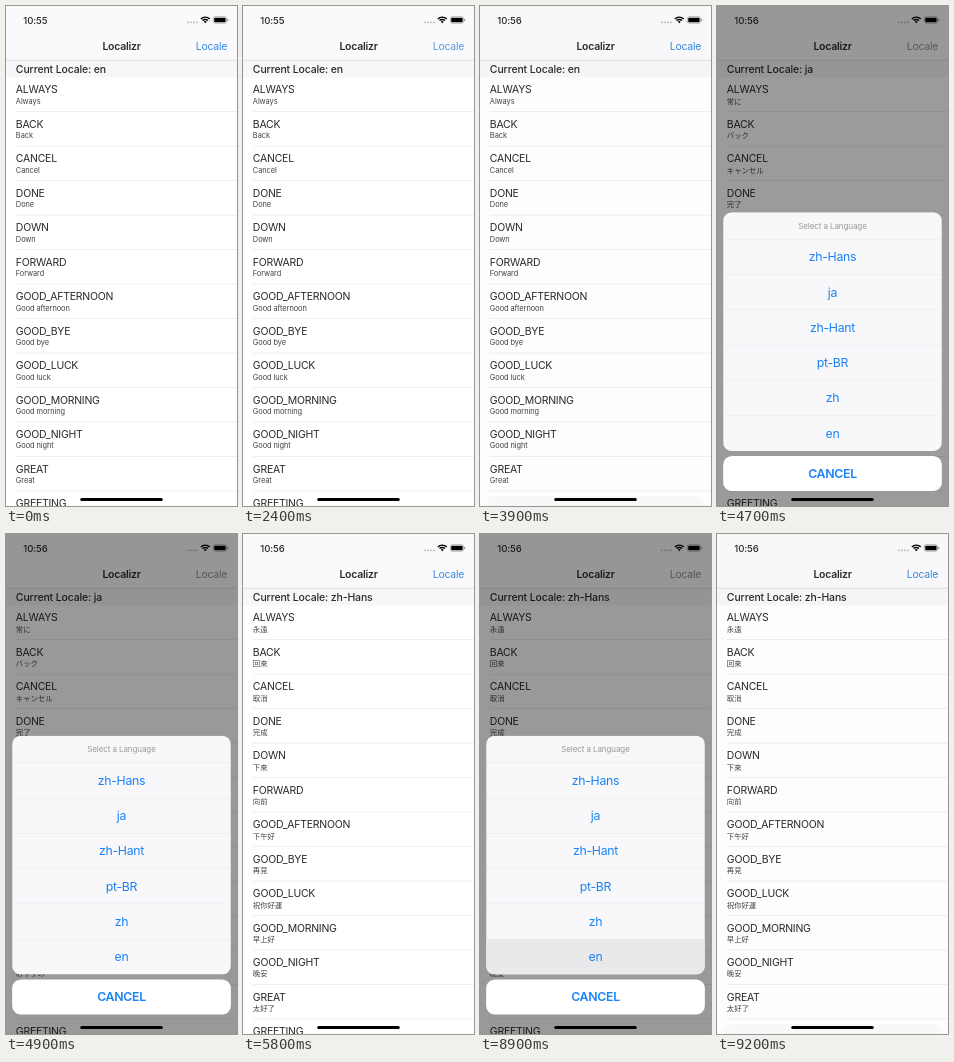
Write an HTML page with a canvas that moves like this. It is 231 px wide and 500 px high and loops after 9300 ms.

```html
<!DOCTYPE html>
<html lang="en">
<head>
<meta charset="utf-8">
<title>Localizr</title>
<style>
  html, body { margin: 0; width: 100%; height: 100%; overflow: hidden; background: #fff; }
  canvas { display: block; width: 231px; height: 500px; }
</style>
</head>
<body>
<canvas id="stage"></canvas>
<script>
const LOOP = 9300, STEP = 100;
const W = 375, H = 812;
const FONT = 'Inter, "Noto Sans CJK JP", sans-serif';
const BLUE = '#1a83f5', INK = '#2a2a2c', SOFT_INK = '#444446';

const KEYS = ['ALWAYS', 'BACK', 'CANCEL', 'DONE', 'DOWN', 'FORWARD', 'GOOD_AFTERNOON',
  'GOOD_BYE', 'GOOD_LUCK', 'GOOD_MORNING', 'GOOD_NIGHT', 'GREAT', 'GREETING'];
const STRINGS = {
  en: ['Always', 'Back', 'Cancel', 'Done', 'Down', 'Forward', 'Good afternoon',
    'Good bye', 'Good luck', 'Good morning', 'Good night', 'Great'],
  ja: ['常に', 'バック', 'キャンセル', '完了', '下', 'フォワード', 'こんにちは',
    'さようなら', '幸運を', 'おはよう', 'おやすみ', 'すごい'],
  'zh-Hans': ['永遠', '回來', '取消', '完成', '下來', '向前', '下午好',
    '再見', '祝你好運', '早上好', '晚安', '太好了']
};
const LANGUAGES = ['zh-Hans', 'ja', 'zh-Hant', 'pt-BR', 'zh', 'en'];

// One entry per appearance of the sheet, times in ms.
const VISITS = [
  { tap: 2400, rise: 2520, pick: 3600, choice: 'ja' },
  { tap: 4400, rise: 4430, pick: 5300, choice: 'zh-Hans' },
  { tap: 6300, rise: 6330, pick: 8900, choice: 'en' }
];
const FALL_DELAY = 72, SWITCH_DELAY = 500, CLOCK_TICK = 2700;

const canvas = document.getElementById('stage');
const ctx = canvas.getContext('2d');
const dpr = window.devicePixelRatio || 1;
canvas.width = Math.round(231 * dpr);
canvas.height = Math.round(500 * dpr);

// Critically damped spring: the share of the way still to go.
function remaining(ms) {
  if (ms <= 0) return 1;
  const x = 22.8 * ms / 1000;
  const rest = (1 + x) * Math.exp(-x);
  return rest < 0.002 ? 0 : rest;
}

function stateAt(t) {
  const state = { locale: 'en', open: 0, pressed: null, touching: false,
    clock: t < CLOCK_TICK ? '10:55' : '10:56' };
  for (const v of VISITS) {
    if (t < v.tap) break;
    state.touching = t < v.tap + STEP;
    state.pressed = t >= v.pick ? v.choice : null;
    state.open = t < v.pick + FALL_DELAY
      ? 1 - remaining(t - v.rise)
      : remaining(t - v.pick - FALL_DELAY);
    if (t >= v.pick + SWITCH_DELAY) state.locale = v.choice;
  }
  return state;
}

function rect(x, y, w, h, color) {
  ctx.fillStyle = color;
  ctx.fillRect(x, y, w, h);
}

function roundRect(x, y, w, h, r, color) {
  ctx.beginPath();
  ctx.roundRect(x, y, w, h, r);
  ctx.fillStyle = color;
  ctx.fill();
}

function text(str, x, y, size, { weight = 400, color = INK, align = 'left', spacing = -0.4 } = {}) {
  ctx.font = `${weight} ${size}px ${FONT}`;
  ctx.letterSpacing = spacing + 'px';
  ctx.textAlign = align;
  ctx.fillStyle = color;
  ctx.fillText(str, x, y);
}

function drawStatus(clock) {
  text(clock, 28, 29, 15.5, { weight: 500, spacing: -0.1 });
  for (let i = 0; i < 4; i++) roundRect(294 + i * 4.8, 25, 3, 3, 1.5, '#b4b4b6');

  ctx.strokeStyle = ctx.fillStyle = '#000';
  ctx.lineWidth = 2.3;
  const cx = 323.5, cy = 28, spread = 0.8;
  for (const r of [10, 6.2]) {
    ctx.beginPath();
    ctx.arc(cx, cy, r, -Math.PI / 2 - spread, -Math.PI / 2 + spread);
    ctx.stroke();
  }
  ctx.beginPath();
  ctx.moveTo(cx, cy);
  ctx.arc(cx, cy, 3.4, -Math.PI / 2 - spread, -Math.PI / 2 + spread);
  ctx.fill();

  ctx.strokeStyle = '#8c8c8e';
  ctx.lineWidth = 1;
  ctx.beginPath();
  ctx.roundRect(336.5, 17.4, 21.5, 10.5, 2.8);
  ctx.stroke();
  roundRect(338, 18.9, 18.5, 7.5, 1.6, '#000');
  roundRect(359, 20.7, 1.6, 4, 0.8, '#8c8c8e');
}

function drawList(locale) {
  rect(0, 0, W, H, '#fff');
  const top = 116, rowHeight = 56;
  KEYS.forEach((key, i) => {
    const y = top + i * rowHeight;
    text(key, 16, y + 25.8, 17);
    text(STRINGS[locale][i] || '', 16, y + 42.6, 12, { spacing: -0.1, color: SOFT_INK });
    rect(16, y + rowHeight - 0.8, W - 16, 0.9, '#e2e1e4');
  });
  rect(0, 88, W, 28, '#f7f6f8');
  text('Current Locale: ' + locale, 16, 108.5, 17, { weight: 500, spacing: -0.2 });
}

function drawNavBar(state) {
  rect(0, 0, W, 88, '#faf9fb');
  rect(0, 87.5, W, 0.9, '#c6c5c8');
  drawStatus(state.clock);
  text('Localizr', W / 2, 72, 17, { weight: 600, align: 'center' });
  const k = state.open;
  const mix = (a, b) => Math.round(a + (b - a) * k);
  ctx.globalAlpha = state.touching ? 0.85 : 1;
  text('Locale', 359, 72, 17, {
    align: 'right',
    color: `rgb(${mix(52, 142)},${mix(140, 142)},${mix(230, 146)})`
  });
  ctx.globalAlpha = 1;
}

function drawSheet(state) {
  const x = 10, w = W - 20, titleHeight = 44, item = 57.33;
  const top = 327.5, height = titleHeight + item * LANGUAGES.length;
  ctx.save();
  ctx.translate(0, (1 - state.open) * (H - top));

  ctx.save();
  ctx.beginPath();
  ctx.roundRect(x, top, w, height, 14);
  ctx.clip();
  rect(x, top, w, height, '#f8f8fa');
  text('Select a Language', W / 2, top + 26.8, 13, { align: 'center', color: '#98989b', spacing: -0.15 });
  LANGUAGES.forEach((name, i) => {
    const y = top + titleHeight + i * item;
    if (name === state.pressed) rect(x, y, w, item, '#e9e9ec');
    rect(x, y - 0.4, w, 0.8, '#e4e4e8');
    text(name, W / 2, y + 35.6, 20, { align: 'center', color: BLUE, spacing: -0.5 });
  });
  ctx.restore();

  const cancelTop = top + height + 8;
  roundRect(x, cancelTop, w, 57, 14, '#fff');
  text('CANCEL', W / 2, cancelTop + 35.6, 20, { weight: 600, align: 'center', color: BLUE, spacing: -0.5 });
  ctx.restore();
}

function draw(t) {
  const state = stateAt(t);
  ctx.setTransform(canvas.width / W, 0, 0, canvas.height / H, 0, 0);
  drawList(state.locale);
  drawNavBar(state);
  if (state.open > 0) {
    rect(0, 0, W, H, `rgba(0,0,0,${0.4 * state.open ** 1.25})`);
    drawSheet(state);
  }
  roundRect(120.5, 799, 134, 5, 2.5, '#000');
}

const start = performance.now();
function tick() {
  const t = (performance.now() - start) % LOOP;
  draw(Math.floor(t / STEP) * STEP);
  requestAnimationFrame(tick);
}
tick();
</script>
</body>
</html>
```
